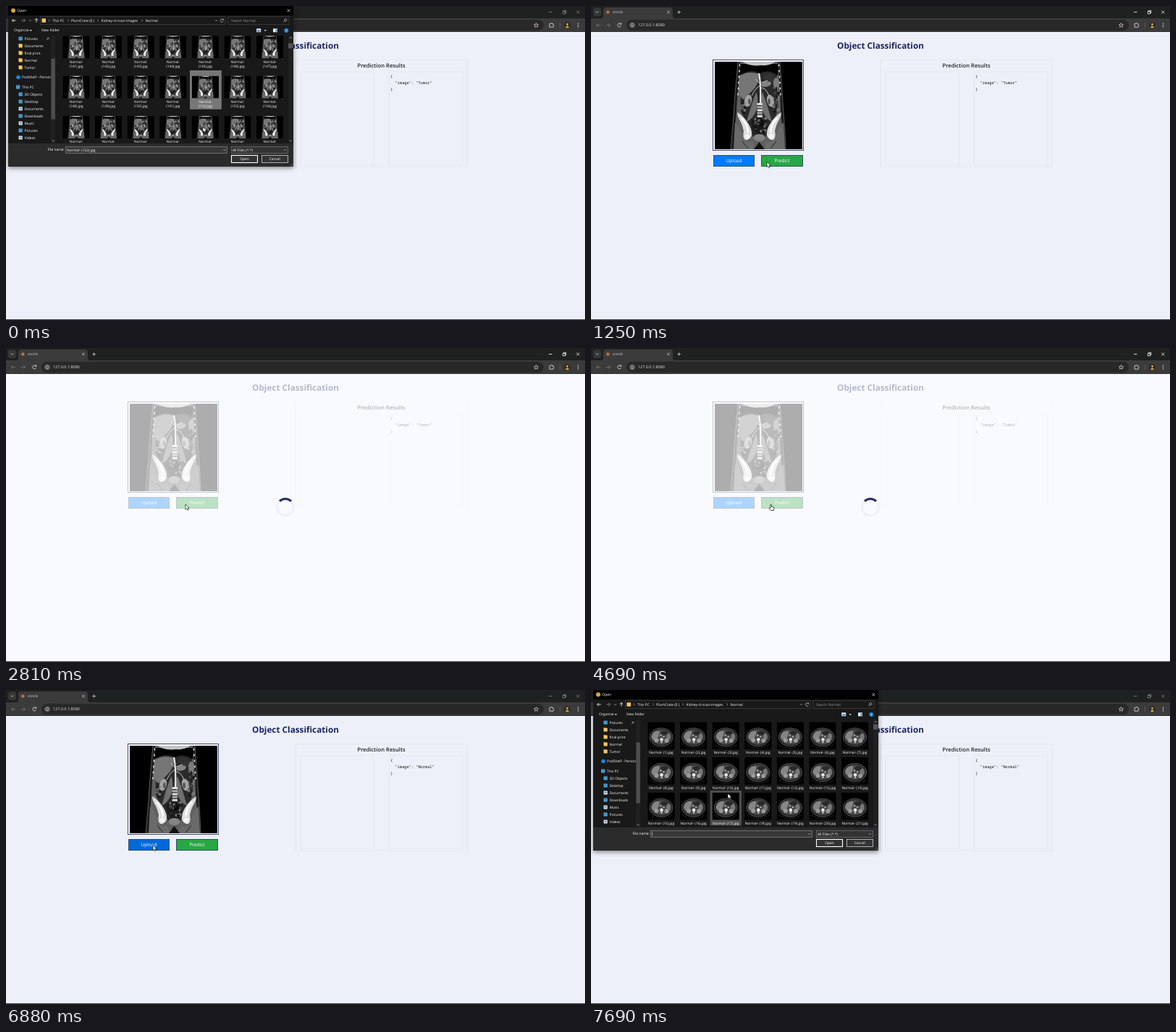
Write an HTML page that moves like this. It is 800 by 434 pixels and loops after 8000 ms.

```html
<!DOCTYPE html>
<html lang="en">
<head>
<meta charset="utf-8">
<title>Object Classification</title>
<style>
  html, body { margin: 0; width: 100%; height: 100%; overflow: hidden; background: #edf0f9; }
  svg { display: block; position: absolute; left: 0; top: 0; width: 800px; height: 434px; }
  text { font-family: "Open Sans", "Noto Sans", sans-serif; text-rendering: geometricPrecision; white-space: pre; }
  .mono { font-family: "Noto Sans Mono", "DejaVu Sans Mono", monospace; }
  #spinner { position: absolute; left: 373px; top: 207px; width: 20px; height: 20px; border: 3px solid #f1f2f6; border-top-color: #2b2a6b; border-radius: 50%; }
</style>
</head>
<body>
<svg id="stage" viewBox="0 0 800 434"></svg>
<div id="spinner"></div>
<svg id="front" viewBox="0 0 800 434"></svg>
<script>
const LOOP = 8000;
const byId = id => document.getElementById(id);

// Markup helpers
const rect = (x, y, w, h, fill, more = '') => `<rect x="${x}" y="${y}" width="${w}" height="${h}" fill="${fill}" ${more}/>`;
const oval = (x, y, rx, ry, fill, more = '') => `<ellipse cx="${x}" cy="${y}" rx="${rx}" ry="${ry}" fill="${fill}" ${more}/>`;
const dot = (x, y, r, fill, more) => oval(x, y, r, r, fill, more);
const shape = (d, fill, more = '') => `<path d="${d}" fill="${fill}" ${more}/>`;
const line = (d, color, w = .8) => shape(d, 'none', `stroke="${color}" stroke-width="${w}"`);
const frame = (x, y, w, h, fill, stroke, sw = .7, more = '') => rect(x, y, w, h, fill, `stroke="${stroke}" stroke-width="${sw}" ${more}`);
const group = (id, body, more = '') => `<g id="${id}" ${more}>${body}</g>`;
// y is the middle of the lower-case letters
const text = (x, y, s, size, fill, more = '') => `<text x="${x}" y="${y + size * .33}" font-size="${size}" fill="${fill}" ${more}>${s}</text>`;
const mid = 'text-anchor="middle"';

let seed = 7;
const random = () => (seed = seed * 16807 % 2147483647) / 2147483647;
const repeat = (n, f) => Array.from({ length: n }, (_, i) => f(i)).join('');

function coronalScan() {
  const mirror = s => s + `<g transform="translate(123 0) scale(-1 1)">${s}</g>`;
  const speckle = (n, x, y, w, h, tones) => repeat(n, i =>
    oval(x + random() * w, y + random() * h, .8 + random() * 1.6, .8 + random() * 1.8, tones[i % tones.length]));
  const iliac = shape('M31 70Q40 75 46 85Q52 94 51 102Q48 109 42 108Q38 105 40 96Q38 86 34 80Q31 75 31 70Z', '#dcdcdc') +
    shape('M37 78Q45 86 46 98', 'none', 'stroke="#fff" stroke-width="2.5"') + dot(45, 103, 3.5, '#f4f4f4');
  const thigh = shape('M28 84Q37 92 39 108Q45 113 52 110L55 121H26Z', '#6a6a6a') + line('M38 110L46 120', '#333', 1.2);
  const kidney = oval(46, 54, 5, 8.5, '#a2a2a2', 'transform="rotate(14 46 54)"') + oval(48, 55, 1.8, 4, '#555');
  return rect(0, 0, 121, 121, '#000') +
    shape('M32 0C30 26 27 50 26 75Q24 99 22 121H98Q97 94 95 70C93 45 92 20 90 0Z', '#1c1c1c', 'stroke="#6d6d6d" stroke-width=".8"') +
    shape('M35 0C34 25 31 45 30 68Q27 94 27 121H95Q94 94 91 68C91 45 88 25 87 0Z', '#606060') +
    shape('M37 4C36 25 35 48 36 68Q43 84 53 104H70Q80 86 87 68C87 48 86 25 85 4Z', '#2a2a2a') +
    shape('M35 3H88L87 19Q74 10 63 16Q48 9 34 19Z', '#030303') +
    shape('M38 0H84Q76 6 64 5Q48 7 38 0Z', '#c4c4c4') +
    shape('M34 20Q46 12 61 17Q62 30 52 40L40 52Q32 48 33 36Z', '#767676') +
    oval(76, 23, 9, 6, '#333', 'transform="rotate(20 76 23)"') + oval(85, 30, 4, 8, '#7c7c7c') +
    oval(71, 31, 7, 3.5, '#838383', 'transform="rotate(-12 71 31)"') +
    mirror(shape('M57 42Q61 50 58 66Q53 79 44 83Q49 63 57 42Z', '#707070')) + mirror(kidney) +
    speckle(18, 34, 56, 8, 16, ['#777', '#161616', '#555']) + speckle(18, 81, 36, 8, 34, ['#777', '#161616', '#555']) +
    line('M61 16Q64 30 63 58', '#e6e6e6', 2.2) + line('M63 33Q57 35 51 47M63 36Q70 35 75 47M57 24L62 30L73 26', '#ccc', 1) +
    repeat(5, i => rect(58.5, 57 + i * 4.2, 7.5, 3, i % 2 ? '#aaa' : '#e0e0e0', 'rx="1"')) +
    shape('M51 80Q62 74 72 80Q75 94 62 103Q49 96 51 80Z', '#1b1b1b') +
    speckle(26, 53, 78, 18, 20, ['#777', '#090909', '#444']) +
    mirror(thigh + iliac) + oval(61.5, 105, 8, 5, '#858585') +
    shape('M54 121L61.5 111L69 121Z', '#111') +
    mirror(repeat(6, i => oval(34.5 - i * .5, 5 + i * 8, .9, 1.8, '#e0e0e0')));
}

function axialScan() {
  return rect(0, 0, 37, 37.5, '#000') +
    line('M3 31Q18 41 34 31', '#3a3a3a', .6) +
    oval(18.5, 20.8, 16.2, 12.7, '#252525', 'stroke="#707070" stroke-width=".6"') +
    oval(18.5, 20.5, 14, 10.5, '#484848') +
    shape('M5 20Q7 11 16 12Q17 18 11 25Q6 25 5 20Z', '#858585') +
    oval(23, 15, 5, 3, '#292929') + oval(28.5, 20, 2.8, 4.5, '#777') +
    oval(12, 25, 3, 3, '#999') + oval(26, 25.5, 3, 3, '#999') +
    dot(19, 24, 2.3, '#e8e8e8') + dot(19, 27.5, 1.4, '#bbb') + dot(18, 18, 1.2, '#aaa') + dot(22, 20, 1.2, '#aaa');
}

function browser() {
  const ink = '#e3e3e3', faint = '#777';
  return rect(0, 0, 800, 18, '#1f2020') + rect(0, 17, 800, 19, '#3c3b3c') +
    rect(3, 2.5, 11, 11.5, '#353636', 'rx="3"') + line('M6.7 7.5L8.5 9.3L10.3 7.5', ink) +
    shape('M14 17Q17 17 17 14V6Q17 2 21 2H109Q113 2 113 6V14Q113 17 116 17Z', '#3c3b3c') +
    dot(23.3, 8.5, 2.3, '#b9714c') + text(30, 8.5, 'cnncls', 4.8, ink) +
    line('M105.2 6.8L108.6 10.2M108.6 6.8L105.2 10.2M119.2 8.5H124M121.6 6.1V10.9', ink, .7) +
    group('controls', line('M750 8.5H754.5M769.3 7.5H772.6V10.8H769.3ZM770.5 7.5V6.3H773.8V9.6H772.6M788.3 6.5L792.3 10.5M792.3 6.5L788.3 10.5', '#fff', .8)) +
    line('M13 26.5H7.5M10 24L7.5 26.5L10 29M21 26.5H26.5M24 24L26.5 26.5L24 29', faint) +
    line('M41.4 25A2.5 2.5 0 1 0 41.5 27.5M41.7 23.3V25.3H39.7', ink) +
    rect(49, 19, 694, 15, '#282828', 'rx="7.5"') + dot(57, 26.5, 4.8, '#3c3c3c') +
    dot(57, 26.5, 2.4, 'none', `stroke="${ink}" stroke-width=".7"`) + line('M57 26V28M57 24.8V25.4', ink, .7) +
    text(65, 26.3, '127.0.0.1:8080', 5.45, ink) +
    shape('M732.5 23.5L733.4 25.5L735.5 25.7L733.9 27.1L734.4 29.2L732.5 28.1L730.6 29.2L731.1 27.1L729.5 25.7L731.6 25.5Z', 'none', `stroke="${ink}" stroke-width=".7"`) +
    line('M751 24.5H752.7A1 1 0 0 1 754.7 24.5H756V26A1 1 0 0 1 756 28V29.2H751Z', ink) +
    line('M765.5 23V30', '#777', .5) + dot(775.5, 26.5, 4, '#28251f') + dot(775.5, 25.3, 1.5, '#d5aa4c') +
    shape('M772.8 29.3Q775.5 25.8 778.2 29.3Q775.5 31 772.8 29.3Z', '#d5aa4c') +
    repeat(3, i => dot(790.5, 24.2 + i * 2.3, .7, ink));
}

const button = (id, x, w, label, fill) =>
  frame(x, 206.5, w, 15, fill, '#33506b', 1, `id="${id}"`) + text(x + w / 2, 214.2, label, 6.5, '#fff', mid);

function page() {
  const edge = '#dfe2ea';
  return rect(0, 36, 800, 398, '#edf0f9') + rect(0, 36, 800, 1, '#fff') +
    text(400, 54.8, 'Object Classification', 11.75, '#1b2564', mid + ' font-weight="700"') +
    frame(168.5, 74.5, 125, 125, '#fbfcff', '#3c4a75', 1) +
    '<use href="#coronal" x="171" y="77"/>' +
    button('upload', 169.5, 56, 'Upload', '#007bff') + button('predict', 235.5, 57, 'Predict', '#28a745') +
    frame(400.5, 75, 236.7, 147, 'none', edge) + frame(407, 91, 101.3, 128, 'none', edge) + frame(529.3, 91, 101.7, 128, 'none', edge) +
    text(518.6, 82.8, 'Prediction Results', 7.65, '#202328', mid + ' font-weight="600"') +
    text(531.3, 97.5, '{', 5.3, '#111', 'class="mono"') +
    text(531.3, 106, '', 5.3, '#111', 'class="mono" id="result"') +
    text(531.3, 114.8, '}', 5.3, '#111', 'class="mono"') +
    group('veil', rect(0, 36, 800, 397, '#fff', 'opacity=".68"')) +
    rect(0, 433, 800, 1, '#34363a');
}

const columnX = i => 97 + i % 7 * 44.6;

function scrolledList() {
  return frame(254.3, 89.3, 43, 53, '#777', '#8d8d8d', .6) + repeat(21, i => {
    const x = columnX(i), y = 41.3 + Math.floor(i / 7) * 55.3;
    return `<use href="#coronal" transform="translate(${x - 18.6} ${y}) scale(.3074 .256)"/>` +
      text(x, y + 36, 'Normal-', 4.8, '#fff', mid) + text(x, y + 42.3, `(${141 + i}).jpg`, 4.8, '#fff', mid);
  }) + rect(390, 51.5, 6.5, 7, '#555');
}

function topList() {
  return rect(0, 0, 43.4, 48.5, '#4d4d4d', 'id="hover"') + repeat(21, i => {
    const x = columnX(i), y = 44.5 + Math.floor(i / 7) * 48.7;
    return `<use href="#axial" x="${x - 18.5}" y="${y}"/>` +
      text(x, y + 42.3, `Normal- (${i + 1}).jpg`, 4.85, '#fff', mid);
  }) + rect(390, 47.5, 6.5, 7, '#555');
}

function sidebar() {
  const rows = [
    ['Pictures', 45], ['Documents', 55], ['final print', 65], ['Normal', 75], ['Tumor', 85],
    ['PodShelf - Person', 98.5, 22], ['This PC', 112, 22], ['3D Objects', 122], ['Desktop', 132], ['Documents', 142],
    ['Downloads', 152], ['Music', 162], ['Pictures', 172], ['Videos', 182]
  ];
  return rows.map(([label, y, x = 25.5], i) => {
    const folder = i > 0 && i < 5;
    const color = folder ? '#f5c95c' : ['#4aa8e0', '#dce6ee'][i > 8 && i % 2 ? 1 : 0];
    const icon = i === 5 ? dot(x - 5, y, 2.8, '#1684d8') :
      rect(x - 8, y - 2.4, 5.2, 4.8, color, 'rx=".6"') + (folder ? rect(x - 8, y - 2.9, 2.5, 1, '#dfa936') : rect(x - 6.8, y - 1, 2.8, 1.4, '#257bb3'));
    return icon + text(x, y, label, 4.9, '#fff');
  }).join('') + line('M56 47L59.5 43.5M57 43.5L59.5 46', '#bbb', .8);
}

function dialog() {
  const chevron = x => line(`M${x} 18.5L${x + 1.4} 20L${x} 21.5`, '#bbb', .6);
  const down = (x, y) => line(`M${x - 1.5} ${y - .7}L${x} ${y + .8}L${x + 1.5} ${y - .7}`, '#ccc', .7);
  return rect(3, 0, 394, 222, '#191919', 'style="filter:drop-shadow(0 2px 3px #0007)"') + rect(3, 0, 394, 13, '#000') +
    dot(10, 6.3, 3, '#d9a441') + text(15.3, 6.5, 'Open', 5, '#fff') +
    line('M388.5 4.5L392.3 8.3M392.3 4.5L388.5 8.3', '#fff', .7) +
    line('M13.5 20H8.5M10.7 17.8L8.5 20L10.7 22.2M42 22.7V17.5M39.8 19.6L42 17.4L44.2 19.6', '#eee', .9) +
    line('M21.5 20H26.5M24.3 17.8L26.5 20L24.3 22.2', '#888', .9) + down(33.5, 20) +
    frame(47.5, 14.8, 255.5, 10.5, '#191919', '#4b4b4b', .6) + rect(49.5, 17.2, 5.5, 5.5, '#f5c95c', 'rx=".6"') +
    [[64, 'This PC'], [90, 'PlumCrate (E:)'], [131.5, 'Kidney-ct-scan-images'], [192.5, 'Normal']].map(([x, s]) => text(x, 20, s, 4.9, '#fff')).join('') +
    [59, 85.3, 126.5, 187.5].map(chevron).join('') + down(290.5, 20) +
    line('M300.3 19A2.2 2.2 0 1 0 300.4 21M300.5 17.5V19.2H298.8', '#ccc', .7) +
    frame(307, 14.8, 84, 10.5, '#191919', '#4b4b4b', .6) + text(311, 20, 'Search Normal', 4.9, '#9a9a9a') +
    dot(386.3, 19.3, 1.6, 'none', 'stroke="#ccc" stroke-width=".7"') + line('M385 20.6L383.3 22.3', '#ccc') +
    text(11, 33.7, 'Organize', 4.9, '#fff') + shape('M32.5 33H36L34.2 35Z', '#ddd') + text(49, 33.7, 'New folder', 4.9, '#fff') +
    rect(346.2, 31.2, 6, 5, '#d7e6f3') + rect(347.2, 33.5, 4, 2, '#3683bd') + shape('M356.5 33H360L358.2 35Z', '#ddd') +
    rect(369, 31.2, 6, 5, '#e7eef4') + rect(372.7, 32, 1.8, 3.6, '#3683bd') +
    dot(387.3, 33.8, 3.1, '#147bd1') + text(387.3, 34, '?', 4.8, '#fff', mid + ' font-weight="700"') +
    '<g clip-path="url(#listArea)">' + rect(62, 41, 6.3, 149, '#202020') + rect(62.4, 72.5, 5.5, 84, '#4d4d4d') + sidebar() +
    rect(390, 41, 6.5, 149, '#202020') + down(65.2, 186.3) + down(393.3, 186.3) + line('M391.8 44.7L393.3 43.2L394.8 44.7', '#ccc', .7) +
    group('scrolled', scrolledList()) + group('top', topList()) + '</g>' +
    rect(3, 190, 394, 32, '#2b2b2b') + text(57.5, 198.8, 'File name:', 4.9, '#fff') +
    frame(82.5, 194.5, 223, 9, '#383838', '#888') + down(302, 199) + text(84, 199, 'Normal- (152).jpg', 4.9, '#fff', 'id="fileName"') +
    group('caret', line('M84.5 196.5V201.5', '#fff', .5)) +
    frame(311.5, 194.5, 78, 9, '#333', '#777') + text(313, 199, 'All Files (*.*)', 4.9, '#fff') + down(385.5, 199) +
    frame(311.5, 206.5, 36, 10, '#333', '#fff', 1.1) + text(329.5, 211.4, 'Open', 4.9, '#fff', mid) +
    frame(353.5, 206.5, 36, 10, '#333', '#ccc', .8) + text(371.2, 211.4, 'Cancel', 4.9, '#fff', mid) +
    repeat(3, i => dot(395.5 - i * 1.3, 220.5, .4, '#999') + dot(395.5, 220.5 - i * 1.3, .4, '#999'));
}

byId('stage').innerHTML =
  `<defs><g id="coronal" clip-path="url(#scanArea)">${coronalScan()}</g><g id="axial">${axialScan()}</g>
   <clipPath id="scanArea"><rect width="121" height="121"/></clipPath>
   <clipPath id="listArea"><rect x="3" y="41" width="394" height="149"/></clipPath></defs>` +
  page() + browser() + group('dialog', dialog());

byId('front').innerHTML =
  group('arrow', shape('M0 0V7.2L1.7 5.7L2.8 8.2L4.1 7.6L3 5.2H5.2Z', '#fff', 'stroke="#000" stroke-width=".6"')) +
  group('hand', shape('M-.1 .8Q.7 -.4 1.5 .8V3.4L4.3 4Q5.2 4.3 5 5.3L4.4 8.5H.5L-1.9 5.4Q-1.7 4.3 -.1 5.3Z', '#fff', 'stroke="#000" stroke-width=".7"'));

// Pointer path: time, x, y
const PATH = [
  [0, 272, 167], [60, 272, 167], [700, 330, 210], [860, 330, 210], [1240, 243, 215.5], [1380, 243, 215.5],
  [1600, 248, 216], [5810, 248, 216], [6450, 203, 214.5], [6980, 203, 214.5], [7600, 189, 143], [LOOP, 189, 143]
];

function pointerAt(t) {
  const i = PATH.findIndex(p => p[0] > t);
  const [t0, x0, y0] = PATH[i - 1], [t1, x1, y1] = PATH[i];
  const u = (t - t0) / (t1 - t0), k = u * u * (3 - 2 * u);
  return [x0 + (x1 - x0) * k, y0 + (y1 - y0) * k];
}

const show = (id, on) => { byId(id).style.display = on ? '' : 'none'; };
const within = (t, a, b) => t >= a && t < b;

function draw(t) {
  const [x, y] = pointerAt(t);
  const closing = t < 900, opening = t >= 7010;
  const loading = within(t, 2810, 4750);
  const onPredict = within(t, 1690, 6600) && x > 235;
  const onUpload = t > 5810 && !opening && x < 225.5;
  const hand = !within(t, 2810, 4630) && t < 6630 && (onPredict || onUpload);

  show('dialog', closing || opening);
  show('scrolled', closing);
  show('fileName', closing);
  show('top', t >= 7200);
  show('caret', opening);
  show('veil', loading);
  show('spinner', loading);
  show('arrow', !hand);
  show('hand', hand);
  byId('controls').setAttribute('opacity', closing || t >= 6700 ? .45 : 1);
  byId('predict').setAttribute('fill', onPredict && !loading ? '#218838' : '#28a745');
  byId('predict').setAttribute('stroke', within(t, 4750, 6630) ? '#2b7f9b' : '#33506b');
  byId('upload').setAttribute('fill', onUpload ? '#0069d9' : '#007bff');
  byId('result').textContent = `  "image": "${t < 4750 ? 'Tumor' : 'Normal'}"`;

  const column = Math.floor((x - 75.4) / 44.6), row = Math.floor((y - 41) / 48.7);
  show('hover', row < 3);
  byId('hover').setAttribute('x', 75.4 + column * 44.6);
  byId('hover').setAttribute('y', 41.5 + row * 48.7);
  for (const id of ['arrow', 'hand']) byId(id).setAttribute('transform', `translate(${x} ${y})`);
}

function tick() {
  draw(performance.now() % LOOP);
  requestAnimationFrame(tick);
}
tick();
</script>
</body>
</html>
```
